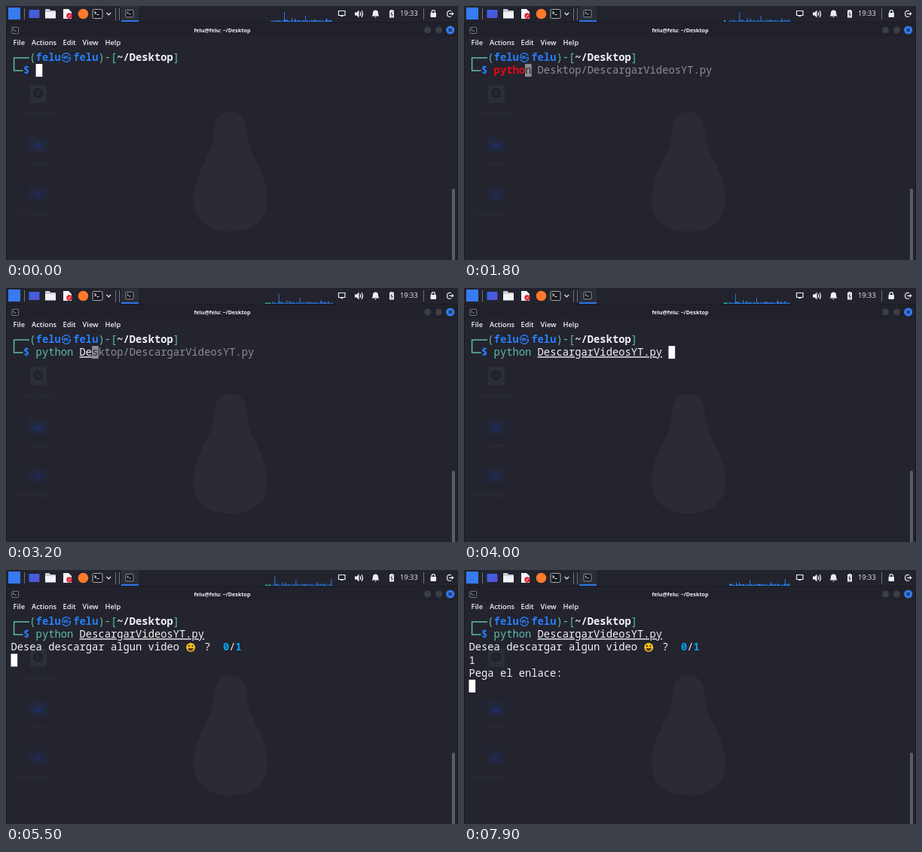
Write an HTML page that moves like this. It is 600 px wide and 338 px high and loops after 8 s.

```html
<!DOCTYPE html>
<html lang="es">
<head>
<meta charset="utf-8">
<title>Terminal</title>
<style>
html, body { margin: 0; height: 100%; overflow: hidden; background: #23242e; }
svg { display: block; width: 100vw; height: 100vh; }
.ui { font-family: "Open Sans", "Noto Sans", sans-serif; fill: #f2f3f5; font-size: 9.3px; font-weight: 600; }
.faint { font: 8px "Open Sans", sans-serif; fill: #2e303a; text-anchor: middle; }
.term { font: 13.8px "Noto Sans Mono", "DejaVu Sans Mono", monospace; fill: #f4f4f6; }
.term text { white-space: pre; }
.b { font-weight: 700; }
.blue { fill: #277fff; }
.green { fill: #5ebdab; }
.red { fill: #e60812; }
.cyan { fill: #05a1f7; }
.hint { fill: #8d8e92; }
.dark { fill: #23242e; }
.u { text-decoration: underline; }
.ksx { font: 700 13px "Noto Sans CJK KR", "Noto Sans CJK JP", "Noto Sans CJK", sans-serif; text-anchor: middle; }
.line { fill: none; stroke: #eceef2; stroke-width: 1.2; }
.sep { stroke: #70737c; stroke-width: 1; }
</style>
</head>
<body>
<svg viewBox="0 0 600 338" preserveAspectRatio="none">
  <defs>
    <linearGradient id="screen" x2="1" y2="1">
      <stop stop-color="#3268e8"/><stop offset="1" stop-color="#5a4fd0"/>
    </linearGradient>
    <g id="shell">
      <rect x=".5" y=".5" width="13" height="12" rx="1.5" fill="#17191f" stroke="#a9abb0"/>
      <path d="M3 3.5l2 1.7-2 1.7M6 7.5h3" class="line" stroke-width="1"/>
    </g>
  </defs>

  <!-- wallpaper seen through the window -->
  <rect width="600" height="338" fill="#23242e"/>
  <path d="M298 141C318 141 319 158 321 178C324 200 347 222 347 258C347 286 326 300 298 300C270 300 249 286 249 258C249 222 272 200 275 178C277 158 278 141 298 141Z" fill="#2b2b35"/>
  <circle cx="42" cy="50" r="11" fill="#252630"/>
  <rect x="32" y="105" width="22" height="24" rx="2" fill="#2c2e37"/>
  <circle cx="42.500" cy="116" r="5.500" fill="#24262e" stroke="#181a20" stroke-width="1.3"/>
  <path d="M30 174h9l2 2h14v18H30z" fill="#22273a"/>
  <path d="M37 185l5.500-5 5.500 5v5H37z" fill="#1f2b58"/>
  <path d="M30 239h9l2 2h14v18H30z" fill="#222638"/>
  <path d="M42 244l6 6.500-6 6.500-6-6.500z" fill="#1f2a52"/>
  <text class="faint" x="43" y="146">File System</text>
  <text class="faint" x="42" y="212">Home</text>
  <text class="faint" x="38" y="278">Homologar…</text>

  <!-- panel -->
  <rect width="600" height="21" fill="#22232d"/>
  <rect x="3" y="2" width="16" height="16" fill="#367bf0"/>
  <rect x="30.500" y="5" width="14" height="11" rx="1" fill="url(#screen)"/>
  <path d="M52 5q0-1 1-1h4.500l1.500 2h6q1 0 1 1v9H52z" fill="#c9ccd4"/>
  <path d="M52 8h14v8.500H52z" fill="#f1f2f5"/>
  <path d="M76 4h7l4 4v9H76z" fill="#f4f4f6"/>
  <circle cx="84" cy="13" r="3.800" fill="#e0263c"/>
  <path d="M82.500 14.500l3-3" stroke="#fff"/>
  <circle cx="102.500" cy="10.500" r="6.800" fill="#ff7a2a"/>
  <use href="#shell" x="114.500" y="4"/>
  <path class="line" d="M133.500 9l2.800 2.800 2.800-2.800"/>
  <path class="sep" d="M24.500 3v15M145.500 3v16M150.500 3v16M554.500 3v15"/>
  <rect x="153" width="23" height="21" fill="#2b2e39"/>
  <rect x="153" y="19" width="23" height="2" fill="#2f76e8"/>
  <use href="#shell" transform="translate(158.500 5) scale(.78)"/>
  <path id="teal" stroke="#35b79b" stroke-width="1"/>
  <path id="load" stroke="#2b78e0" stroke-width="1"/>
  <path class="line" d="M441.500 6.500h8.500v6h-8.500zM444 13.500h3.500"/>
  <path d="M463 8.500h2.500l3-3v10l-3-3H463z" fill="#eceef2"/>
  <path class="line" d="M470 8q1.800 2.500 0 5M472 6q3 4.500 0 9"/>
  <path d="M485.500 13.500q1.500-1.500 1.500-4.500 0-3.500 3.500-3.500t3.500 3.500q0 3 1.500 4.500zM489 14.500h3l-1.500 1.300z" fill="#eceef2"/>
  <path d="M510.500 5h3v1h1.500v9.500h-6V6h1.500z" fill="#eceef2"/>
  <path d="M512.700 7.500l-2 3.500h2.500l-1.300 3" fill="none" stroke="#20232b" stroke-width=".9"/>
  <text class="ui" x="523" y="13.300" style="font-weight:400">19:33</text>
  <rect x="563.500" y="9" width="7.500" height="6" rx=".8" fill="#eceef2"/>
  <path class="line" d="M565 9.500V8q0-2.400 2.250-2.400T569.500 8v1.500"/>
  <path class="line" d="M591 6.500q-5.500-1-5.500 3.800t5.500 3.800M588 10.300h5.500M591.700 8.300l2 2-2 2"/>

  <!-- window frame -->
  <rect y="21" width="600" height="20" fill="#20212a"/>
  <rect x=".5" y="21.500" width="599" height="330" fill="none" stroke="#191b22"/>
  <use href="#shell" transform="translate(7.500 28) scale(.68)"/>
  <text class="ui" x="287" y="34.700" text-anchor="middle" style="font-size:7.200px;font-weight:700">felu@felu: ~/Desktop</text>
  <circle cx="559.500" cy="32" r="4.500" fill="#3b3e47"/>
  <circle cx="574.500" cy="32" r="4.500" fill="#3b3e47"/>
  <circle cx="589.700" cy="32" r="5.600" fill="#347bee"/>
  <path d="M587.700 30l4 4m0-4l-4 4" stroke="#14213c" stroke-width="1.100"/>
  <g class="ui">
    <text x="9.500" y="52">File</text><text x="34" y="52">Actions</text><text x="75.500" y="52">Edit</text>
    <text x="101.500" y="52">View</text><text x="131.500" y="52">Help</text>
  </g>
  <rect x="592" y="243" width="4" height="97" rx="2" fill="#5b5d65"/>

  <!-- prompt -->
  <path d="M31 69H10.600V77M10.600 77V86H22.500" fill="none" stroke="#5ebdab" stroke-width="1.500"/>
  <g class="term" id="term"></g>
</svg>

<script>
const LOOP = 8000, CELL = 8.28, LEFT = 6.5, ROW = 17.2;
const $ = id => document.getElementById(id);
const colX = c => LEFT + c * CELL;
const put = (row, col, str, cls = '') =>
  `<text x="${colX(col)}" y="${73 + row * ROW}" class="${cls}">${str}</text>`;
const cursor = (row, col, fill = '#fff') =>
  `<rect x="${colX(col)}" y="${59.9 + row * ROW}" width="${CELL + .4}" height="17" fill="${fill}"/>`;

const prompt = put(0, 3, '(', 'green') + put(0, 4, 'felu', 'blue b') +
  '<text x="80" y="73" class="ksx blue">㉿</text>' + put(0, 10, 'felu', 'blue b') +
  put(0, 14, ')-[', 'green') + put(0, 17, '~/Desktop', 'b') + put(0, 26, ']', 'green') +
  put(1, 2, '$', 'blue b');

const smile = `<g transform="translate(245.200 103)"><circle r="6" fill="#fcc21b"/>
  <ellipse cx="-2.200" cy="-1.800" rx=".9" ry="1.400" fill="#4a3420"/><ellipse cx="2.200" cy="-1.800" rx=".9" ry="1.400" fill="#4a3420"/>
  <path d="M-3.800 1h7.600q-.6 3.700-3.800 3.700T-3.800 1z" fill="#5b3a1e"/></g>`;
const question = put(2, 0, 'Desea descargar algun video') + smile + put(2, 31, '?') +
  put(2, 34, '0', 'cyan b') + put(2, 35, '/') + put(2, 36, '1', 'cyan b');

const FILE = 'DescargarVideosYT.py', HINT = 'python Desktop/' + FILE;
const KEYS = [1300, 1400, 1500, 1700, 1800, 2000, 2800, 3000, 3200, 3300];
const TAB = 3500, ENTER = 4300, ASK = 4500, ANSWER = 6000, LINK = 6700;

function command(t) {
  if (t >= TAB) return put(1, 4, 'python', 'green') + put(1, 11, FILE, 'u');
  const n = KEYS.filter(k => t >= k).length;
  if (!n) return cursor(1, 4);
  const word = HINT.slice(0, Math.min(n, 6));
  return put(1, 4, word, n < 6 ? 'red b' : 'green') +
    (n > 7 ? put(1, 11, HINT.slice(7, n), 'u') : '') +
    cursor(1, 4 + n, '#8d8e92') + put(1, 4 + n, HINT[n], 'dark') +
    put(1, 5 + n, HINT.slice(n + 1), 'hint');
}

function terminal(t) {
  let s = prompt + command(t);
  if (t >= ASK) s += question;
  if (t >= ANSWER) s += put(3, 0, '1');
  if (t >= LINK) s += put(4, 0, 'Pega el enlace:') + cursor(5, 0);
  else if (t >= ANSWER) s += cursor(3, 1);
  else if (t >= ASK) s += cursor(3, 0);
  else if (t >= ENTER) s += cursor(2, 0);
  else if (t >= TAB) s += cursor(1, 32);
  return s;
}

// Load graph: scrolls left one notch at a time
const PEAKS = { 0: 13, 1: 3, 10: 5, 14: 4, 28: 8, 40: 3, 56: 5, 75: 9 };
const noise = i => { const v = Math.sin(i * 127.1) * 43758.5; return v - Math.floor(v); };
const bar = (x, h) => `M${x.toFixed(2)} 21v${-h.toFixed(2)}`;

function graph(step) {
  let d = '';
  for (let i = -20; i < 105; i++) {
    const x = 369.5 + i - .6 * step;
    if (x >= 351.8 && x < 433.5) d += bar(x, PEAKS[i] || .7 + 2.6 * noise(i) ** 2);
  }
  return d;
}

function teal(t, step) {
  if (t < 1000 || t >= 7200) return '';
  if (t < 2400) return bar(345.5, 2) + bar(346.5, 2);
  let d = '';
  for (let i = 0; i < 7; i++) d += bar(344.5 + i, noise(i + step) < .75 ? 1.5 : .4);
  return d;
}

let shown = '';
function frame(now) {
  const t = now % LOOP, step = Math.floor(t / 260), text = terminal(t);
  if (text !== shown) $('term').innerHTML = shown = text;
  $('load').setAttribute('d', graph(step));
  $('teal').setAttribute('d', teal(t, step));
  requestAnimationFrame(frame);
}
frame(0);
</script>
</body>
</html>
```
